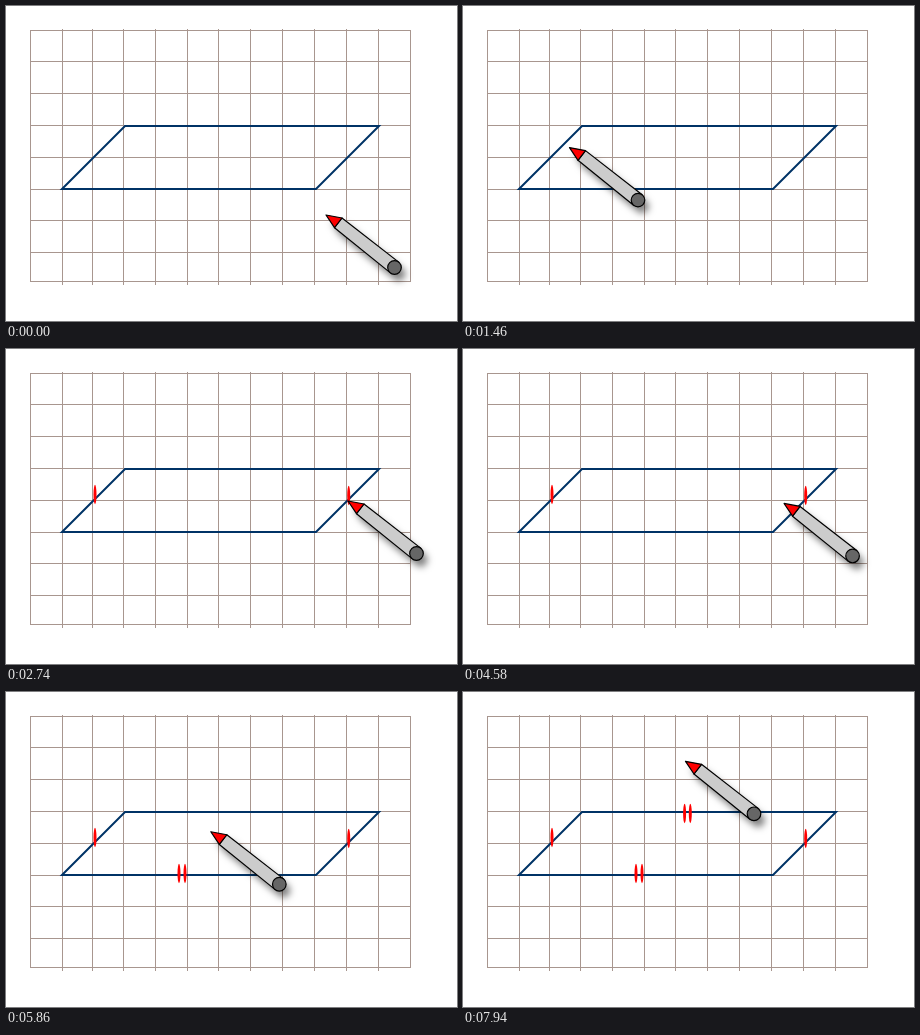
An HTML page with a canvas that plays this animation: 451 px wide and 315 px high, repeating every 8000 ms.

```html
<!DOCTYPE html>
<html lang="en">
<head>
<meta charset="utf-8">
<title>Marking equal sides of a parallelogram</title>
<style>
  html, body { margin: 0; width: 100%; height: 100%; overflow: hidden; background: #fff; }
  canvas { display: block; }
</style>
</head>
<body>
<canvas id="stage" width="451" height="315"></canvas>
<script>
const ctx = document.getElementById('stage').getContext('2d');
const LOOP = 8000, TICK = 80;

const columns = [24, 56, 86, 117, 149, 181, 212, 244, 276, 308, 340, 372, 404];
const rows = [24, 55, 87, 119, 151, 183, 214, 246, 275];

// Pen tip: each leg moves to (x, y) in equal ticks, the first one at `at`.
const start = { x: 320, y: 209 };
const legs = [
  { at: 580, ticks: 13, x: 88.7, y: 136 },
  { at: 1700, ticks: 1, x: 89, y: 151 },
  { at: 1940, ticks: 9, x: 342, y: 137 },
  { at: 2740, ticks: 1, x: 342, y: 152 },
  { at: 4580, ticks: 8, x: 174.5, y: 171.7 },
  { at: 5300, ticks: 1, x: 174.5, y: 186 },
  { at: 5540, ticks: 8, x: 223, y: 112 },
  { at: 6260, ticks: 1, x: 223, y: 126 },
  { at: 6740, ticks: 16, x: 222.5, y: 69.3 }
];

const marks = [
  { at: 1700, x: 89, y: 145.5 },
  { at: 2740, x: 342.7, y: 146.5 },
  { at: 5300, x: 173, y: 181.5 },
  { at: 5300, x: 179, y: 181.5 },
  { at: 6260, x: 221.6, y: 121.5 },
  { at: 6260, x: 227.3, y: 121.5 }
];

function penTip(t) {
  let { x, y } = start;
  for (const leg of legs) {
    if (t < leg.at) break;
    const k = Math.min(1, (Math.floor((t - leg.at) / TICK) + 1) / leg.ticks);
    x += (leg.x - x) * k;
    y += (leg.y - y) * k;
  }
  return { x, y };
}

function polygon(points) {
  ctx.beginPath();
  points.forEach(([x, y]) => ctx.lineTo(x, y));
  ctx.closePath();
}

function disc(x, y, rx, ry) {
  ctx.beginPath();
  ctx.ellipse(x, y, rx, ry, 0, 0, Math.PI * 2);
}

function paint(fill) {
  ctx.fillStyle = fill;
  ctx.fill();
  ctx.stroke();
}

function drawGrid() {
  ctx.fillStyle = '#a8968f';
  for (const y of rows) ctx.fillRect(24, y, 381, 1);
  columns.forEach((x, i) => {
    const outer = i === 0 || i === columns.length - 1;
    ctx.fillRect(x, outer ? 24 : 23, 1, outer ? 252 : 256);
  });
}

function drawParallelogram() {
  polygon([[56, 183], [119, 120], [373, 120], [310, 183]]);
  ctx.strokeStyle = '#003366';
  ctx.lineWidth = 2;
  ctx.stroke();
}

function drawMark({ x, y }) {
  disc(x, y, 1.5, 9.7);
  ctx.fillStyle = '#f00';
  ctx.fill();
}

function drawPen({ x, y }) {
  const top = [16, 3], bottom = [8.5, 12.7];
  const end = { x: 68.5, y: 52.5, r: 6.8 };
  ctx.save();
  ctx.translate(x, y);
  ctx.lineJoin = 'round';

  // Silhouette that casts the shadow
  ctx.save();
  ctx.shadowColor = 'rgba(0,0,0,.5)';
  ctx.shadowBlur = 7;
  ctx.shadowOffsetX = 5;
  ctx.shadowOffsetY = 7;
  polygon([[0, 0], top, [72.7, 47.1], [75, 53], [70, 59], [64.4, 57.9], bottom]);
  ctx.fillStyle = '#ccc';
  ctx.fill();
  ctx.restore();

  ctx.strokeStyle = '#000';
  ctx.lineWidth = 1.2;
  polygon([top, [72.7, 47.1], [64.4, 57.9], bottom]);
  paint('#ccc');
  polygon([[0, 0], top, bottom]);
  paint('#f00');
  disc(end.x, end.y, end.r, end.r);
  paint('#666');
  ctx.restore();
}

function frame() {
  const t = performance.now() % LOOP;
  ctx.fillStyle = '#fff';
  ctx.fillRect(0, 0, 451, 315);
  drawGrid();
  drawParallelogram();
  marks.filter(m => t >= m.at).forEach(drawMark);
  drawPen(penTip(t));
  requestAnimationFrame(frame);
}
frame();
</script>
</body>
</html>
```
